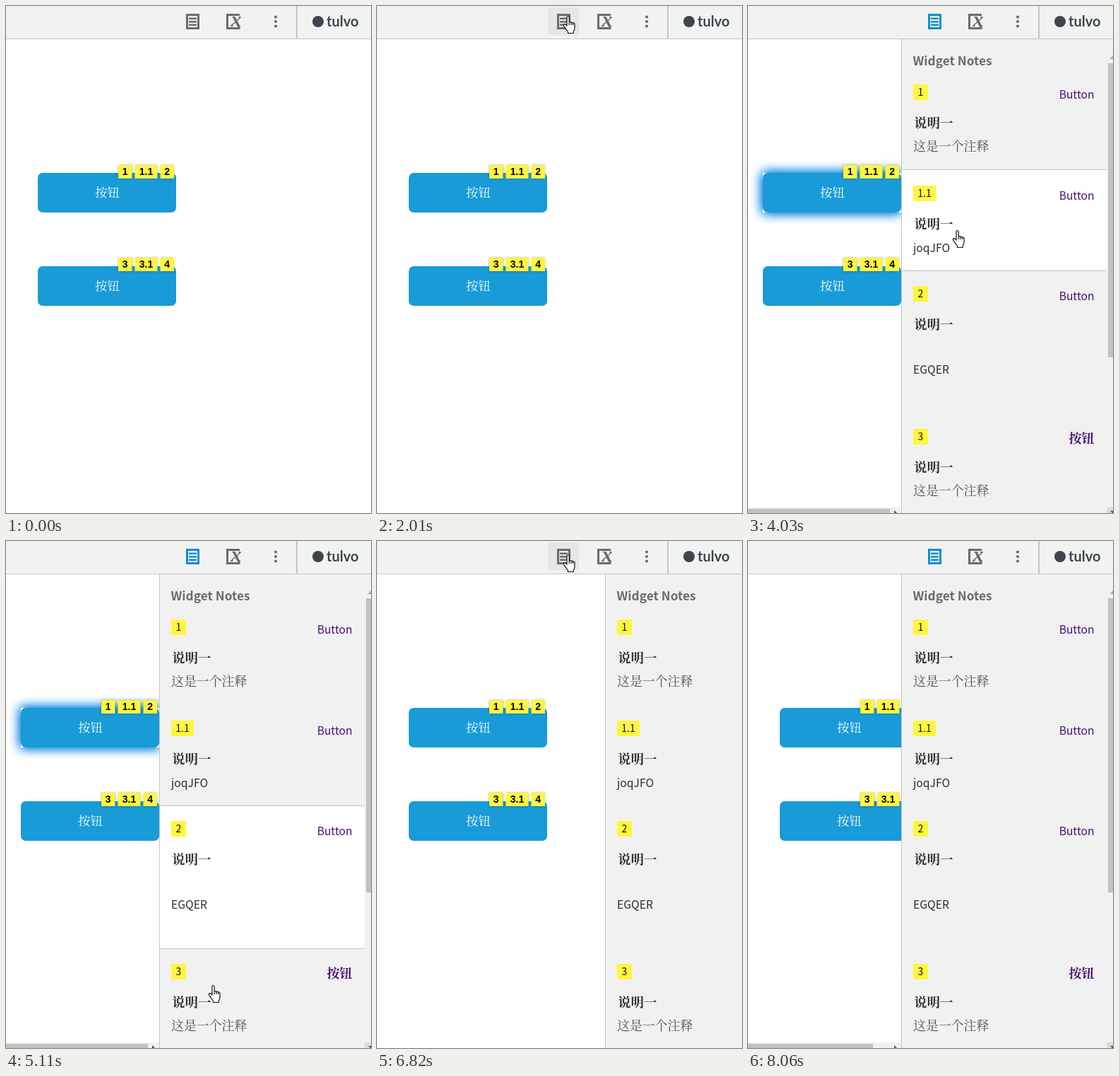
These frames come from a looping animation (517x717 px, 8550 ms). An HTML page with a canvas:

```html
<!DOCTYPE html>
<html lang="zh">
<head>
<meta charset="utf-8">
<title>Widget notes</title>
<style>
html, body { margin: 0; width: 100%; height: 100%; overflow: hidden; background: #fff; }
canvas { display: block; }
</style>
</head>
<body>
<canvas id="stage" width="517" height="717"></canvas>
<script>
const ctx = document.getElementById('stage').getContext('2d');
const W = 517, H = 717, LOOP = 8550;
const BAR = 46, PANEL = 300, EDGE = W - PANEL;
const SLIDE = 200, SCROLL = 24, PAUSE = 150;

const SANS = '"Noto Sans CJK SC", "Noto Sans CJK", sans-serif';
const SONG = '"Noto Serif CJK SC", ' + SANS;
const GREY = '#6b6b6b', BLUE = '#0a8fcd', LINE = '#c6c6c6', YELLOW = '#fff640';
const INK = '#2b2b2b', LINK = '#450f75', LOGO = '#3d464d';

// Id, link and text of each note; a line break makes the note taller
const NOTES = [
  ['1', 'Button', '这是一个注释'],
  ['1.1', 'Button', 'joqJFO'],
  ['2', 'Button', '\nEGQER'],
  ['3', '按钮', '这是一个注释']
];

// Time, action (note index, 'icon' or none) and cursor place
const STEPS = [
  [-80, null, 414, 604],
  [1140, 'icon', 269, 14],
  [1770, 'icon', 264, 14],
  [2300, 'icon', 264, 14],
  [2950, 0, 299, 180],
  [3870, 1, 290, 312],
  [4730, 2, 290, 460],
  [5270, 3, 287, 628],
  [5970, null, 247, 408],
  [6740, 'icon', 264, 19],
  [7360, 'icon', 264, 19],
  [8210, null, 524, 300]
];

const HAND = new Path2D('M5 2.5q0-2 1.6-2t1.6 2V9q1.6-1 2.8.5 1.7-.8 2.7.8 2.3-.5 2.3 1.7v5q0 3-1.8 5v2.5H6.5v-2L1 14.8q-1.2-2 .2-3 1.4-.5 2.6.9L5 14z');
const KNUCKLES = new Path2D('M8.2 9.5V13M11 9.5V13M13.6 10.5V13');
const ARROW = new Path2D('M.5.5V16l3.6-3.4 2.4 5.6 2.3-1-2.4-5.4h4.9z');

const clamp = p => Math.max(0, Math.min(1, p));
const swing = p => 0.5 - 0.5 * Math.cos(Math.PI * clamp(p));
const easeOut = p => Math.sin(Math.PI / 2 * clamp(p));
const mix = (a, b, p) => Math.round(a + (b - a) * p);

function rect(x, y, w, h, color) {
  ctx.fillStyle = color;
  ctx.fillRect(x, y, w, h);
}

function round(x, y, w, h, r, color) {
  ctx.fillStyle = color;
  ctx.beginPath();
  ctx.roundRect(x, y, w, h, r);
  ctx.fill();
}

function disc(x, y, r, color) {
  ctx.fillStyle = color;
  ctx.beginPath();
  ctx.arc(x, y, r, 0, Math.PI * 2);
  ctx.fill();
}

function shape(path, color) {
  ctx.fillStyle = color;
  ctx.fill(new Path2D(path));
}

function text(str, x, y, font, color, align = 'left') {
  ctx.font = font;
  ctx.fillStyle = color;
  ctx.textAlign = align;
  ctx.fillText(str, x, y);
}

function shadowed(color, blur, paint) {
  ctx.save();
  ctx.shadowColor = color;
  ctx.shadowBlur = blur;
  paint();
  ctx.restore();
}

function tags(ids, y) {
  let x = 159;
  for (const id of ids) {
    const w = id.length > 1 ? 32 : 19.5;
    shadowed('rgba(0,0,0,.35)', 3, () => rect(x, y, w, 19, YELLOW));
    text(id, x + w / 2, y + 14, 'bold 14px "Liberation Sans", Arial, sans-serif', '#000', 'center');
    x += w + 4;
  }
}

function button(y, ids, glow) {
  if (glow) {
    for (let i = 0; i < 2; i++) shadowed('#0a84e0', 15, () => rect(45, y, 196, 56, '#fff'));
  }
  round(45, y, 196, 56, 7, '#189bd7');
  text('按钮', 143.5, y + 34, '17.5px ' + SONG, '#fff', 'center');
  tags(ids, y - 11.5 + (y < 300 ? 0.5 : -0.5));
}

function page(pick, scroll, bar) {
  ctx.save();
  ctx.translate(-Math.round(scroll), 0);
  button(236, ['1', '1.1', '2'], pick >= 0 && pick < 3);
  button(368, ['3', '3.1', '4'], pick === 3);
  ctx.restore();
  if (bar) {
    rect(0, 709, EDGE, 8, '#f1f1f1');
    rect(0, 711, 177 + scroll, 6, '#c1c1c1');
    shape('M207 713l4 4-4 4z', '#505050');
  }
}

function noteHeight(body) {
  return body.startsWith('\n') ? 202 : 142.5;
}

function note([id, link, body], top, picked) {
  const height = noteHeight(body);
  const y = Math.floor(top + 22.5);
  if (picked) {
    rect(218, Math.floor(top), 290, height, '#fff');
    for (const edge of [top, top + height]) rect(218, Math.floor(edge), 290, 1, LINE);
  }
  const w = id.length > 1 ? 32 : 21;
  rect(234, y, w, 22, YELLOW);
  text(id, 234 + w / 2, y + 16, '14px ' + SANS, '#111', 'center');
  const linkFont = link === 'Button' ? '15.6px ' + SANS : 'bold 18px ' + SONG;
  text(link, 490.5, y + 20, linkFont, LINK, 'right');
  text('说明一', 235, y + 61, 'bold 18.5px ' + SONG, INK);
  const line = body.trim();
  const han = line.charCodeAt(0) > 255;
  const drop = body === line ? 94 : 124;
  text(line, 234, y + drop, han ? '17.9px ' + SONG : '15.7px ' + SANS, han ? '#505050' : INK);
}

function panel(x, pick) {
  ctx.save();
  ctx.beginPath();
  ctx.rect(0, BAR + 1, W, H);
  ctx.clip();
  ctx.translate(x - EDGE, 0);
  rect(EDGE, BAR, PANEL, H, '#f1f1f1');
  text('Widget Notes', 233.5, 84, 'bold 17.3px ' + SANS, GREY);
  let top = 89;
  NOTES.forEach((n, i) => {
    note(n, top, i === pick);
    top += noteHeight(n[2]);
  });
  rect(EDGE, BAR, 1, H, LINE);
  rect(510, 81, 7, 416, '#c1c1c1');
  shape('M512.5 75l4.500-5 4.500 5z', '#a3a3a3');
  rect(508, 709, 9, 8, '#dcdcdc');
  shape('M513 714h8l-4 4z', '#505050');
  ctx.restore();
}

function outline(path, color) {
  ctx.strokeStyle = color;
  ctx.lineWidth = 3;
  ctx.stroke(new Path2D(path));
}

function toolbar(iconColor, pressed) {
  rect(0, 0, W, BAR, '#f1f3f2');
  rect(0, BAR, W, 1, LINE);
  rect(411, 0, 2, BAR, '#c4c6c5');
  if (pressed) round(242, 2, 44, 39, 4, '#e5e6e6');
  outline('M256.5 12.5h16v19h-16z', iconColor);
  outline('M331 12.5h-17.5v19h16.500v-4', GREY);
  text('x', 326, 28.5, 'italic bold 30px "Liberation Serif", "Times New Roman", serif', GREY, 'center');
  for (let i = 0; i < 3; i++) {
    rect(259, 16.5 + 4.5 * i, 11, 2.5, iconColor);
    disc(382, 15.5 + 6.5 * i, 2.1, GREY);
  }
  disc(442, 22, 8, LOGO);
  text('tulvo', 454, 29, 'bold 20px Lato, sans-serif', LOGO);
}

// Rest after one step, then arrive shortly before the next
function cursorAt(t) {
  const next = STEPS.findIndex(s => s[0] > t);
  const [t1, , x1, y1] = STEPS.at(next);
  if (next < 0) return [x1, y1];
  const [t0, , x0, y0] = STEPS[next - 1];
  const p = easeOut((t - t0 - PAUSE) / (t1 - t0 - 2 * PAUSE));
  return [mix(x0, x1, p), mix(y0, y1, p)];
}

function cursor([x, y], isHand) {
  const body = isHand ? HAND : ARROW;
  ctx.save();
  ctx.translate(x, y);
  ctx.lineWidth = 1.2;
  ctx.lineJoin = 'round';
  ctx.fillStyle = '#fff';
  ctx.strokeStyle = '#111';
  ctx.fill(body);
  ctx.stroke(body);
  if (isHand) ctx.stroke(KNUCKLES);
  ctx.restore();
}

function draw(t) {
  const done = STEPS.filter(s => s[0] <= t && s[1] !== null);
  const toggles = done.filter(s => s[1] === 'icon');
  const open = toggles.length % 2 === 1;
  const move = toggles.length ? swing((t - toggles.at(-1)[0]) / SLIDE) : 1;
  const shown = open ? move : 1 - move;

  const last = done.length ? done.at(-1)[1] : 'icon';
  const pick = last === 'icon' ? -1 : last;
  const firstPick = STEPS.find(s => s[1] === 0)[0];
  const scroll = pick < 0 ? 0 : SCROLL * swing((t - firstPick - 80) / 300);

  const at = cursorAt(t);
  const hover = at[0] > 236 && at[0] < 282 && at[1] < 41;
  const fresh = toggles.length === 0;

  rect(0, 0, W, H, '#fff');
  page(pick, scroll, shown === 1);
  if (shown > 0) panel(Math.round(W - PANEL * shown), pick);
  toolbar(open || (hover && fresh) ? BLUE : GREY, hover && !fresh);
  if (t >= 70) cursor(at, hover || !fresh);
}

function tick(now) {
  draw(now % LOOP);
  requestAnimationFrame(tick);
}
requestAnimationFrame(tick);
</script>
</body>
</html>
```
